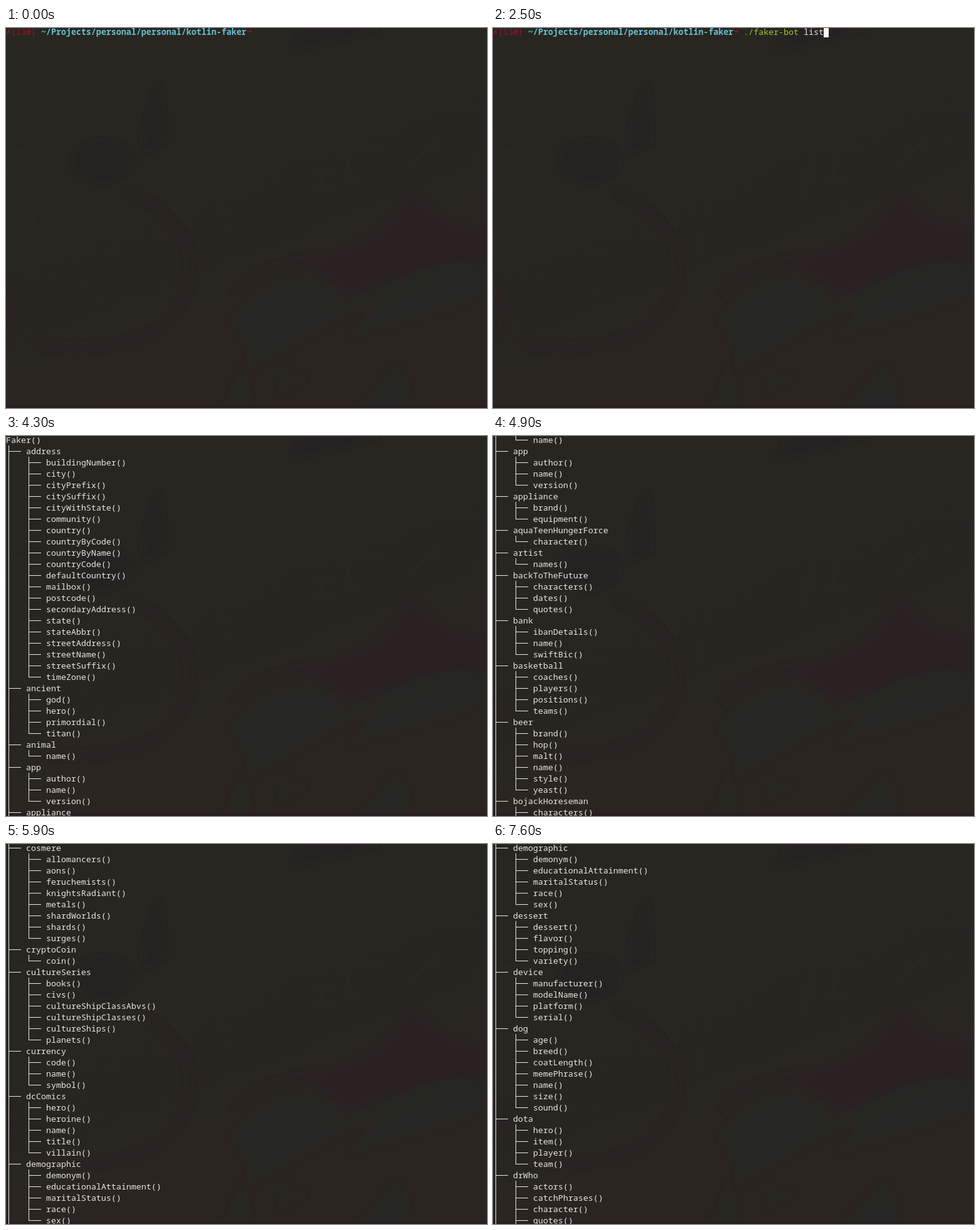
Write an HTML page that moves like this. It is 768x606 px and loops after 8000 ms.

```html
<!DOCTYPE html>
<html lang="en">
<head>
<meta charset="utf-8">
<title>Terminal session</title>
<style>
  html, body { margin: 0; width: 100%; height: 100%; overflow: hidden; background: #272621; }
  #stage {
    position: relative; width: 768px; height: 606px; overflow: hidden;
    font: 13.333px/18px "Noto Sans Mono", "DejaVu Sans Mono", monospace;
    color: #e8e7de; white-space: pre; font-variant-ligatures: none;
  }
  #wall { position: absolute; inset: 0; }
  #shell, #tree { position: absolute; left: 0; top: -3px; width: 768px; }
  #shell span { position: absolute; top: 0; }
  .red { color: #a60f2b; }
  .path { left: 56px; font-weight: bold; color: #68bfd2; }
  .sign { font-family: "DejaVu Sans Mono", monospace; font-weight: bold; }
  .ok { color: #a0c732; }
  #cursor { position: absolute; width: 8px; height: 18px; background: #f8f8ee; }

  #tree { visibility: hidden; }
  #trunk { position: absolute; left: 4px; top: 18px; bottom: 0; width: 1px; background: #eae9e0; }
  .row { position: relative; height: 18px; }
  .group { padding-left: 32px; }
  .leaf { padding-left: 64px; }
  .row::before, .row::after { position: absolute; background: #eae9e0; }
  .group::after, .leaf::after { content: ""; top: 9px; width: 20px; height: 1px; left: 4px; }
  .leaf::after { left: 36px; }
  .leaf::before { content: ""; left: 36px; top: 0; width: 1px; height: 18px; }
  .last::before { height: 10px; }
</style>
</head>
<body>
<div id="stage">
  <svg id="wall" width="768" height="606" viewBox="0 0 768 606">
    <defs>
      <linearGradient id="warm" x1="0.25" y1="0" x2="0.75" y2="1">
        <stop offset="0.4" stop-color="#2b2522" stop-opacity="0"/>
        <stop offset="0.8" stop-color="#2b2522"/>
      </linearGradient>
      <filter id="soft"><feGaussianBlur stdDeviation="4"/></filter>
    </defs>
    <rect width="768" height="606" fill="#272621"/>
    <rect width="768" height="606" fill="url(#warm)"/>
    <g filter="url(#soft)">
      <path d="M645 255 Q700 320 768 320 V375 Q650 385 545 430 Q500 370 430 378 L360 425 Q380 390 450 370 Q600 360 645 255Z" fill="#2c2422"/>
      <path d="M360 465 Q400 400 490 395 L545 432 Q480 480 395 530Z" fill="#282820"/>
      <path d="M768 375 Q690 392 600 432 L550 490 Q650 470 768 425Z" fill="#282820"/>
      <path d="M375 540 L395 606 H350Z M430 540 L480 560 L440 580Z M630 535 L650 606 H560Z" fill="#282820"/>
      <path d="M390 535 Q560 435 640 403 T768 392" fill="none" stroke="#262521" stroke-width="20"/>
      <path d="M0 400 Q30 450 0 490Z" fill="#2b2421"/>
      <path d="M200 262 Q330 330 280 440 Q230 525 50 506" fill="none" stroke="#2a2421" stroke-width="9"/>
      <ellipse cx="155" cy="212" rx="47" ry="32" fill="#252420"/>
      <path d="M245 90 Q255 140 252 185 L225 195 Q205 180 245 90Z M455 35 L600 0 H470Z" fill="#252420"/>
    </g>
    <g fill="none" stroke="#2a2924" stroke-width="2">
      <path d="M224 60 Q226 120 160 168 M80 190 Q45 250 42 320 M650 222 Q660 195 695 181 M620 101 H655"/>
      <path d="M0 232 L30 195 H8 M265 285 L295 320 M36 470 Q25 510 0 545" />
      <path d="M494 222 Q510 235 498 262 M548 205 L540 250 M288 360 Q290 390 280 405"/>
    </g>
    <rect y="602" width="768" height="4" fill="#291e21"/>
  </svg>

  <div id="shell">
    <span class="red sign" style="left:0">✗</span>
    <span class="red" style="left:8px">[130]</span>
    <span class="path">~/Projects/personal/personal/kotlin-faker</span>
    <span class="red sign" style="left:384px">➜</span>
    <span style="left:400px"><i id="bot" style="font-style:normal"></i><i id="args" style="font-style:normal"></i><i id="pager" style="font-style:normal"></i></span>
    <div id="cursor"></div>
  </div>
  <div id="tree"><div id="trunk"></div></div>
</div>
<script>
const LOOP = 8000, ROW = 18, CELL = 8, COMMAND_X = 400;
const BOT = "./faker-bot", ARGS = " list | ", PAGER = "less";
const COMMAND = BOT + ARGS + PAGER;
const ENTER = 3600;

// Each group: its name, then its functions.
const GROUPS = `
address buildingNumber city cityPrefix citySuffix cityWithState community country countryByCode countryByName countryCode defaultCountry mailbox postcode secondaryAddress state stateAbbr streetAddress streetName streetSuffix timeZone
ancient god hero primordial titan
animal name
app author name version
appliance brand equipment
aquaTeenHungerForce character
artist names
backToTheFuture characters dates quotes
bank ibanDetails name swiftBic
basketball coaches players positions teams
beer brand hop malt name style yeast
bojackHoreseman characters quotes tongueTwisters
book author genre publisher title
bossaNova artists songs
breakingBad character episode
buffy actors bigBads celebrities characters episodes quotes
business creditCardExpiryDates creditCardNumbers creditCardTypes
cannabis brands buzzwords cannabinoidAbbreviations cannabinoids categories healthBenefits medicalUses strains terpenes types
cat breed name registry
chiquito expressions jokes sentences terms
chuckNorris fact
code asin
coffee blendName body country intensifier notes variety
coin flip
color name
commerce department productName promotionCode
company bs buzzwords industry name profession suffix type
construction heavyEquipment materials roles standardCostCodes subcontractCategories trades
cosmere allomancers aons feruchemists knightsRadiant metals shardWorlds shards surges
cryptoCoin coin
cultureSeries books civs cultureShipClassAbvs cultureShipClasses cultureShips planets
currency code name symbol
dcComics hero heroine name title villain
demographic demonym educationalAttainment maritalStatus race sex
dessert dessert flavor topping variety
device manufacturer modelName platform serial
dog age breed coatLength memePhrase name size sound
dota hero item player team
drWho actors catchPhrases character quotes species`.trim().split("\n");

// Times at which the pager opens and then moves on by half a page.
const PAGES = [4200, 4800, 5300, 5600, 5800, 5900, 6100];
const HALF_PAGE = 28;

const $ = id => document.getElementById(id);
const shell = $("shell"), tree = $("tree"), cursor = $("cursor");

function addRow(text, kind) {
  const row = document.createElement("div");
  row.className = "row " + kind;
  row.textContent = text;
  tree.append(row);
}

addRow("Faker()", "");
for (const line of GROUPS) {
  const [name, ...calls] = line.split(" ");
  addRow(name, "group");
  calls.forEach((call, i) =>
    addRow(call + "()", i === calls.length - 1 ? "leaf last" : "leaf"));
}

// Number of keys pressed by time t, for a steady run of typing.
const run = (t, start, gap, count) =>
  Math.max(0, Math.min(count, Math.floor((t - start) / gap) + 1));

function typed(t) {
  return run(t, 600, 1, 1) * 3 + run(t, 800, 100, 9)
    + run(t, 1800, 200, 4) + run(t, 2600, 110, 7);
}

function word(el, full, text) {
  el.textContent = text;
  return text === full;
}

function draw(t) {
  const page = PAGES.filter(at => t >= at).length - 1;
  const paging = page >= 0;
  shell.style.visibility = paging ? "hidden" : "visible";
  tree.style.visibility = paging ? "visible" : "hidden";
  if (paging) {
    tree.style.transform = `translateY(${-page * HALF_PAGE * ROW}px)`;
    return;
  }
  const count = typed(t), text = COMMAND.slice(0, count);
  const argsAt = BOT.length, pagerAt = argsAt + ARGS.length;
  $("bot").className = word($("bot"), BOT, text.slice(0, argsAt)) ? "ok" : "";
  word($("args"), ARGS, text.slice(argsAt, pagerAt));
  $("pager").className = word($("pager"), PAGER, text.slice(pagerAt)) ? "ok" : "red";

  const entered = t >= ENTER;
  cursor.style.display = t < 100 ? "none" : "block";
  cursor.style.left = (entered ? 0 : COMMAND_X + count * CELL) + "px";
  cursor.style.top = (entered ? ROW : 0) + "px";
}

const start = performance.now();
function tick() {
  draw((performance.now() - start) % LOOP);
  requestAnimationFrame(tick);
}
tick();
</script>
</body>
</html>
```
